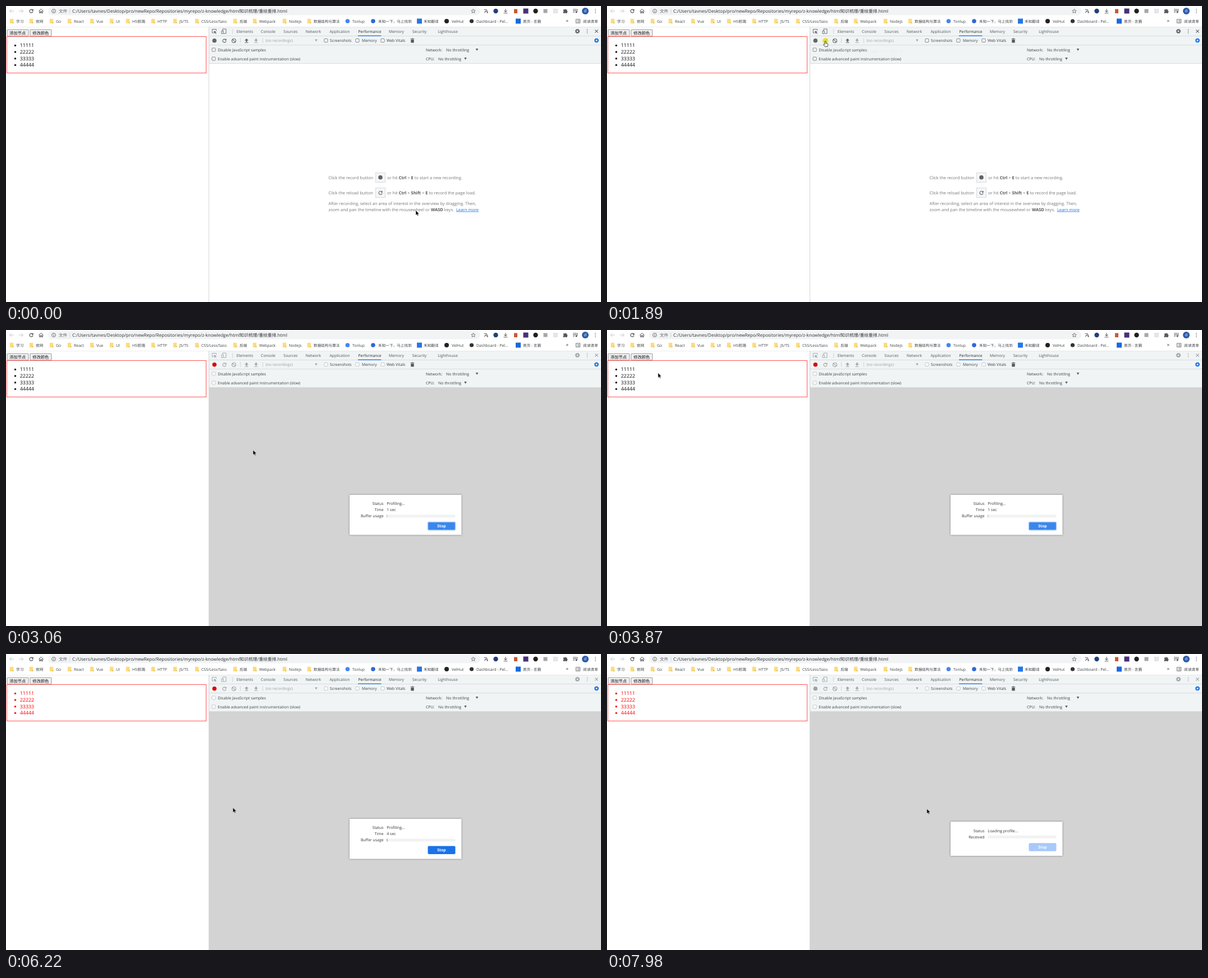
Write an HTML page that moves like this. It is 1060x528 px and loops after 8000 ms.

```html
<!DOCTYPE html>
<html lang="zh">
<head>
<meta charset="utf-8">
<title>Performance recording</title>
<style>
html, body { margin: 0; width: 100%; height: 100%; overflow: hidden; background: #fff; }
svg { display: block; width: 1060px; height: 528px; font-family: "Open Sans", "Noto Sans CJK SC", "Noto Sans CJK", sans-serif; text-rendering: geometricPrecision; }
text { white-space: pre; }
.step { animation: 8s step-end infinite; }
.flow { animation: 8s linear infinite; }
.line { fill: none; stroke: currentColor; }
@keyframes tip {
  0%, 15.9% { opacity: 0 }
  17.5%, 22.9% { opacity: 1 }
  23.6% { opacity: .06 }
  24.3%, 100% { opacity: 0 }
}
</style>
</head>
<body>
<svg id="stage" viewBox="0 0 1060 528"></svg>
<script>
const LOOP = 8000;
let css = '', count = 0;
const pct = ms => (ms / LOOP * 100).toFixed(3) + '%';

// Markup that is visible only between two times.
const show = (from, to, inner) => {
  const name = 'show' + count++;
  css += `@keyframes ${name}{0%{opacity:0}${pct(from)}{opacity:1}${pct(to)}{opacity:0}}`;
  return `<g class="step" style="animation-name:${name}">${inner}</g>`;
};
// Markup that moves along [time, x, y] points.
const move = (points, inner) => {
  const name = 'move' + count++;
  css += `@keyframes ${name}{${points.map(([t, x, y]) => `${pct(t)}{transform:translate(${x}px,${y}px)}`).join('')}}`;
  return `<g class="flow" style="animation-name:${name}">${inner}</g>`;
};
const text = (x, y, s, size = 7, fill = '#3c4043', more = '') =>
  `<text x="${x}" y="${y}" font-size="${size}" fill="${fill}" ${more}>${s}</text>`;
const rect = (x, y, w, h, fill, more = '') =>
  `<rect x="${x}" y="${y}" width="${w}" height="${h}" fill="${fill}" ${more}/>`;
const dot = (x, y, r, fill, more = '') => `<circle cx="${x}" cy="${y}" r="${r}" fill="${fill}" ${more}/>`;
const icon = (x, y, d, color = '#5f6368', width = 1) =>
  `<path transform="translate(${x} ${y})" d="${d}" color="${color}" class="line" stroke-width="${width}"/>`;
const solid = (x, y, d, fill = '#5f6368', more = '') =>
  `<path transform="translate(${x} ${y})" d="${d}" fill="${fill}" ${more}/>`;
const reload = (x, y, color) =>
  icon(x, y, 'M2.3-1.9A3 3 0 1 0 3 .6', color, 1.1) + solid(x, y, 'M3.7-3.8V-.4H.3z', color);
const gear = (x, y, color) =>
  dot(x, y, 2.4, 'none', `stroke="${color}" stroke-width="1.8"`) +
  dot(x, y, 3.5, 'none', `stroke="${color}" stroke-width="1.4" stroke-dasharray="1.6 1.149"`);
const more = (x, y, color) => [-3, 0, 3].map(d => dot(x, y + d, .8, color)).join('');
const box = (x, y, color = '#666') => rect(x - 3, y - 3, 6, 6, '#fff', `rx="1" stroke="${color}" stroke-width=".8"`);
const caret = (x, y, fill = '#5f6368') => solid(x, y, 'M-2.4-2H2.4L0 2z', fill);
const vline = (x, y, h, color = '#cacdd1') => rect(x, y, .8, h, color);

const folder = x => rect(x - 3.2, 22.8, 6.4, 8.2, '#fbdc7f', 'rx=".8"') + rect(x + 1.3, 28.7, 2.3, 2.3, '#ecc45a');

function browser() {
  const marks = [[18, '学习'], [53, '官网'], [89, 'Go'], [121, 'React'], [161, 'Vue'], [196, 'UI'], [225, 'H5前端'],
    [270, 'HTTP'], [309, 'JS/TS'], [348, 'CSS/Less/Sass'], [416, '后端'], [451, 'Webpack'], [504, 'Nodejs'], [548, '数据结构与算法']];
  const label = (x, s) => text(x, 29.5, s, /[a-z]/i.test(s) ? 6.9 : 6.65);
  return rect(75, 1.5, 770, 15, '#f1f3f4', 'rx="7.5"') +
    icon(10, 9, 'M4 0H-3.5M0-3.5L-3.5 0L0 3.5', '#c4c6c8') +
    icon(27, 9, 'M-4 0H3.5M0-3.5L3.5 0L0 3.5', '#c4c6c8') +
    show(0, 2050, reload(45, 9, '#45494d')) +
    show(2050, 2260, icon(45, 9, 'M-3-3L3 3M3-3L-3 3', '#45494d', 1.1)) +
    show(2260, LOOP, reload(45, 9, '#45494d')) +
    icon(62.5, 9, 'M-4 .2L0-3.6L4 .2M-2.7-.6V3.5H-.9V.8H.9V3.5H2.7V-.6', '#45494d') +
    icon(85, 9, 'M-3.4 0A3.4 3.4 0 1 0 3.4 0A3.4 3.4 0 1 0-3.4 0M0-.5V2M0-2V-1.2', '#5f6368', .9) +
    text(94, 11.7, '文件', 7.6, '#5f6368') + vline(113.5, 5, 8) +
    text(118, 11.7, 'C:/Users/tavnes/Desktop/pro/newRepo/Repositories/myrepo/z-knowledge/html<tspan font-size="7.8">知识梳理</tspan>/<tspan font-size="7.8">重绘重排</tspan>.html', 8.05, '#2f3337') +
    icon(832.5, 9, 'M0-3.7L1.1-1.2L3.7-1L1.7.8L2.4 3.4L0 2L-2.4 3.4L-1.7.8L-3.7-1L-1.1-1.2z', '#5f6368', .8) +
    icon(855, 9, 'M-3.5-2.5H1L3.5 3M-3 3L0-1M-2 1H3', '#666', 1.1) + dot(857.5, 12, 1, '#777') +
    dot(872.5, 9, 4.2, '#213f7c') +
    icon(890, 9, 'M0-4V1.5M-2.5-.8L0 1.8L2.5-.8M-3.5 3.7H3.5', '#666', 1.1) +
    rect(905, 5.5, 6, 7.5, '#c65b35') + rect(921.5, 4.5, 9, 9, '#49307a') +
    dot(943.5, 9, 4.2, '#202020') + rect(957.5, 5.5, 7, 7, '#a3a8aa') +
    rect(975.5, 5.5, 7, 7, '#e5e6e7', 'stroke="#d2d4d5" stroke-width=".6"') +
    solid(996.5, 9, 'M-3.8-2.4H-1.5A1.4 1.4 0 0 1 1.2-2.4H3V-.2A1.4 1.4 0 0 1 3 2.5V4H.7A1.4 1.4 0 0 0-1.7 4H-3.8V1.8A1.4 1.4 0 0 0-3.8-.7z', '#55595d') +
    icon(1014, 9, 'M-4-3H2M-4-.5H2M-4 2H-1M3.3 2V-3H4.5', '#55595d', 1.1) + dot(1016, 11, 1.5, '#55595d') +
    dot(1032, 9, 6, '#2f5ca9') + text(1032, 11.4, 'd', 7, '#fff', 'text-anchor="middle"') + more(1050, 9, '#55595d') +
    marks.map(([x, s]) => folder(x - 8) + label(x, s)).join('') +
    dot(608.5, 27, 3.8, '#4285f4') + label(617, 'Tonlup') +
    dot(654, 27, 3.8, '#2d68d8') + label(663, '禾知一下，马上找到') +
    rect(732, 22.5, 9, 9, '#2576e8') + label(744, '禾知翻译') +
    dot(785, 27, 4, '#222') + label(794, 'VelHut') +
    dot(829.5, 27, 3.6, '#333') + label(838, 'Dashboard - Pel...') +
    rect(908, 22.5, 9, 9, '#1769e0') + label(921, '首页 - 言圃') +
    text(997.5, 29.3, '»', 9, '#444') +
    icon(1019, 27, 'M-3.7-3.3H3.7V3.3H-3.7zM-2-1.5H-1M0-1.5H2.3M-2 .2H-1M0 .2H2.3M-2 1.8H-1M0 1.8H2.3', '#55595d', .8) +
    text(1028, 29.5, '阅读清单', 6.65);
}

function page() {
  const button = (x, s, bg, edge) =>
    rect(x, 42, 38, 11.8, bg, `rx="1" stroke="${edge}" stroke-width=".8"`) + text(x + 4.2, 50.7, s, 7.3, '#111');
  const plain = button(43, '修改颜色', '#efefef', '#858585');
  const list = color => [1, 2, 3, 4].map((n, i) =>
    dot(16.5, 70.4 + i * 11.65, 1.7, color) + text(24.8, 73.2 + i * 11.65, String(n).repeat(5), 8.9, color)).join('');
  return button(2, '添加节点', '#efefef', '#858585') + show(0, 4300, plain) +
    show(4300, 5520, button(43, '修改颜色', '#dfdfdf', '#555')) + show(5520, LOOP, plain) +
    rect(1.5, 54.5, 355, 65, 'none', 'stroke="#ff5656"') +
    show(0, 5460, list('#111')) + show(5460, LOOP, list('#f00'));
}

function tools() {
  const tabs = [[425.5, 'Elements'], [467, 'Console'], [507, 'Sources'], [547.5, 'Network'], [594.5, 'Application'],
    [648, 'Performance'], [695.5, 'Memory'], [736.5, 'Security'], [787, 'Lighthouse']];
  const icons = c =>
    icon(371, 45, 'M3.5-1V-3.5H-3.7V3H-1', c, .9) + solid(371, 45, 'M-.8-.8L4.3 1.2L2 2L3.9 4L3 4.7L1.2 2.7L.2 4.6z', c) +
    icon(388, 45, 'M-2-1V-4H4V4H0M-4-.5H-.8V4.2H-4z', c, .9) +
    reload(389, 62, c) + icon(406, 62, 'M-3.5 0A3.5 3.5 0 1 0 3.5 0A3.5 3.5 0 1 0-3.5 0M-2.4-2.4L2.4 2.4', c, 1.1) +
    solid(428.5, 62, 'M0-4L3.5-.4H1.2V2H-1.2V-.4H-3.5zM-3 2.8H3V3.8H-3z', c) +
    gear(1018, 45, c) + more(1035.5, 45, c) + icon(1052, 45, 'M-2.7-2.7L2.7 2.7M2.7-2.7L-2.7 2.7', c, 1.1);
  const boxes = c => box(370, 78, c) + box(370, 94, c) + [570, 626, 671].map(x => box(x, 61.5, c)).join('');
  const record = c => dot(371.3, 61.7, 3.8, c);
  return rect(361, 37, 699, 65.5, '#f0f4f5') + rect(0, 37, 1060, .6, '#e0e2e4') + rect(361, 37, .8, 491, '#c9cccf') +
    [53.2, 69.4, 102].map(y => rect(361.5, y, 699, .7, '#cfd3d6')).join('') +
    tabs.map(([x, s]) => text(x, 47.8, s, s === 'Performance' ? 6.75 : 6.9, s === 'Performance' ? '#222' : '#50555a', 'text-anchor="middle"')).join('') +
    rect(627, 52.5, 41.5, 1.3, '#1a73e8') + [403, 417, 457].map((x, i) => vline(x, i ? 57 : 41, 9)).join('') +
    show(0, 1944, icons('#5f6368') + boxes('#666')) + show(1944, LOOP, icons('#a0a4a8') + boxes('#bbb')) +
    show(0, 1944, record('#666')) + show(1944, 2250, record('#a3a3a3')) +
    show(2250, 7550, record('#d90b0b')) + show(7550, LOOP, record('#a3a3a3')) +
    solid(445.5, 62, 'M0 2L3.5-1.4H1.2V-4H-1.2V-1.4H-3.5zM-3 2.8H3V3.8H-3z', '#a5a9ac') +
    text(462.5, 64.3, '(no recordings)', 6.9, '#9b9fa3') + caret(552.5, 61.5, '#a5a9ac') +
    text(577, 64.3, 'Screenshots', 6.8) + text(634, 64.3, 'Memory', 6.8) + text(678, 64.3, 'Web Vitals', 6.9) +
    solid(724, 61.5, 'M-3.3-3.2H-1.2V-4H1.2V-3.2H3.3V-2.2H-3.3zM-2.7-1.6H2.7V4H-2.7z', '#55595d') + gear(1052, 61.5, '#1a73e8') +
    text(377.3, 80.6, 'Disable JavaScript samples', 6.95) + text(377.3, 96.8, 'Enable advanced paint instrumentation (slow)', 6.9) +
    text(748, 80.6, 'Network:', 6.9) + text(784, 80.6, 'No throttling', 6.9) + caret(839, 78) +
    text(748, 96.8, 'CPU:', 6.9) + text(770, 96.8, 'No throttling', 6.9) + caret(818.5, 94);
}

function hints() {
  const key = s => `<tspan font-weight="700" fill="#555">${s}</tspan>`;
  const line = (x, y, s) => text(x, y, s, 7.5, '#777');
  const square = y => rect(658.5, y - 8.5, 17, 17, '#f4f6f7', 'stroke="#d0d3d5" stroke-width=".8"');
  return line(574.5, 308.7, 'Click the record button') + square(306) + dot(667, 305.8, 3.8, '#5f6368') +
    line(679, 308.7, `or hit ${key('Ctrl')} + ${key('E')} to start a new recording.`) +
    line(574.5, 335.7, 'Click the reload button') + square(333) + reload(667, 333.2, '#5f6368') +
    line(679, 335.7, `or hit ${key('Ctrl')} + ${key('Shift')} + ${key('E')} to record the page load.`) +
    line(574.5, 354.7, 'After recording, select an area of interest in the overview by dragging. Then,') +
    line(574.5, 365.6, 'zoom and pan the timeline with the mousewheel or') + line(757, 365.6, `${key('WASD')} keys.`) +
    text(802, 365.6, 'Learn more', 7.4, '#1a73e8', 'text-decoration="underline"');
}

function dialog() {
  const card = (y, h) => rect(612, y, 199.5, h, '#fff', 'style="filter:drop-shadow(0 .7px 1.5px #0007)"');
  const label = (y, s) => text(672.5, y, s, 6.85, '#333', 'text-anchor="end"');
  const value = (y, s) => text(678.3, y, s, 6.95, '#333');
  const bar = y => rect(678.3, y, 122, 5, '#f1f2f3');
  const stop = (y, bg, ring = 'none') => rect(751.5, y, 49, 14.5, bg, `rx="2" stroke="${ring}" stroke-width="1.3"`) +
    text(776, y + 9.9, 'Stop', 6.9, '#fff', 'text-anchor="middle" font-weight="700"');
  const ticks = [2200, 2980, 4010, 5000, 6010, 7000, 7550];
  return show(1944, LOOP, rect(361.8, 102.7, 698.2, 425.3, '#d3d3d3')) +
    show(1944, 2200, card(294, 71.5) + label(312.2, 'Status') + value(312.2, 'Initializing profiler…') +
      label(323.3, 'Time') + bar(326.7) + stop(342.5, '#a8c9f9')) +
    show(2200, 7550, card(294, 71.5) + label(312.2, 'Status') + value(312.2, 'Profiling…') +
      label(323.3, 'Time') + label(334.4, 'Buffer usage') + bar(329.5) +
      ticks.slice(0, -1).map((t, i) => show(t, ticks[i + 1], value(323.3, i + ' sec'))).join('') +
      show(2600, 6100, rect(678.3, 329.5, .8, 5, '#aaa')) + show(6100, LOOP, rect(678.3, 329.5, 1.3, 5, '#999')) +
      show(2200, 5460, stop(342.5, '#3b86ec', '#a9c9f8')) + show(5460, LOOP, stop(342.5, '#1a73e8'))) +
    show(7550, LOOP, card(299, 61) + label(317.7, 'Status') + value(317.7, 'Loading profile…') +
      label(328.8, 'Received') + bar(323.8) + stop(337.2, '#a8c9f9'));
}

function pointer() {
  const arrow = solid(0, 0, 'M0 0V8.8L2 7L3.4 10L4.8 9.3L3.5 6.5H6.2z', '#000', 'stroke="#fff" stroke-width=".5"');
  const hand = solid(0, 0, 'M-1 .8Q0-.8 1 .8V4L3.6 4.6Q4.8 5 4.6 6.4L3.9 10.5H-.8L-3.6 6.7Q-3.3 5.2-1 6.8z', '#fff', 'stroke="#222" stroke-width=".8"') +
    icon(0, 0, 'M1 4V6M2.4 4.5V6', '#555', .5);
  const path = [[0, 730, 364.5], [70, 730, 364.5], [250, 655, 290], [450, 510, 160], [650, 405, 78], [750, 372, 63],
    [870, 385, 60], [940, 385, 60], [1100, 389, 62], [1895, 389, 62], [1944, 390, 65], [2300, 452, 179], [2500, 452, 179],
    [2780, 445.8, 216.5], [3050, 445.8, 216.5], [3350, 290, 150], [3730, 94, 80], [3800, 94, 80], [4340, 69.8, 52],
    [5480, 69.8, 52], [5810, 194, 177], [6010, 194, 177], [6210, 404.3, 274], [6280, 404.3, 274], [6490, 378, 260],
    [6630, 378, 260], [6700, 404, 290], [6970, 404, 290], [7050, 406, 286], [7250, 406, 286], [7720, 569.8, 276], [LOOP, 569.8, 276]];
  const spot = (x, y) => dot(x, y, 5.5, '#f2ec2c', 'opacity=".75"');
  return show(1830, 1944, spot(389, 62)) + show(5400, 5500, spot(70, 52)) +
    `<g class="flow" style="animation-name:tip">${rect(389, 73.5, 149, 13.5, '#fff', 'stroke="#bbb" stroke-width=".7"')}${
      text(392, 82.7, 'Start profiling and reload page. Ctrl + Shift + E', 6.4, '#575757')}</g>` +
    move(path, show(0, 700, arrow) + show(700, 2030, hand) + show(2030, LOOP, arrow));
}

const art = rect(0, 0, 1060, 528, '#fff') + browser() + page() + tools() + hints() + dialog() + pointer();
document.head.appendChild(document.createElement('style')).textContent = css;
document.getElementById('stage').innerHTML = art;
</script>
</body>
</html>
```
